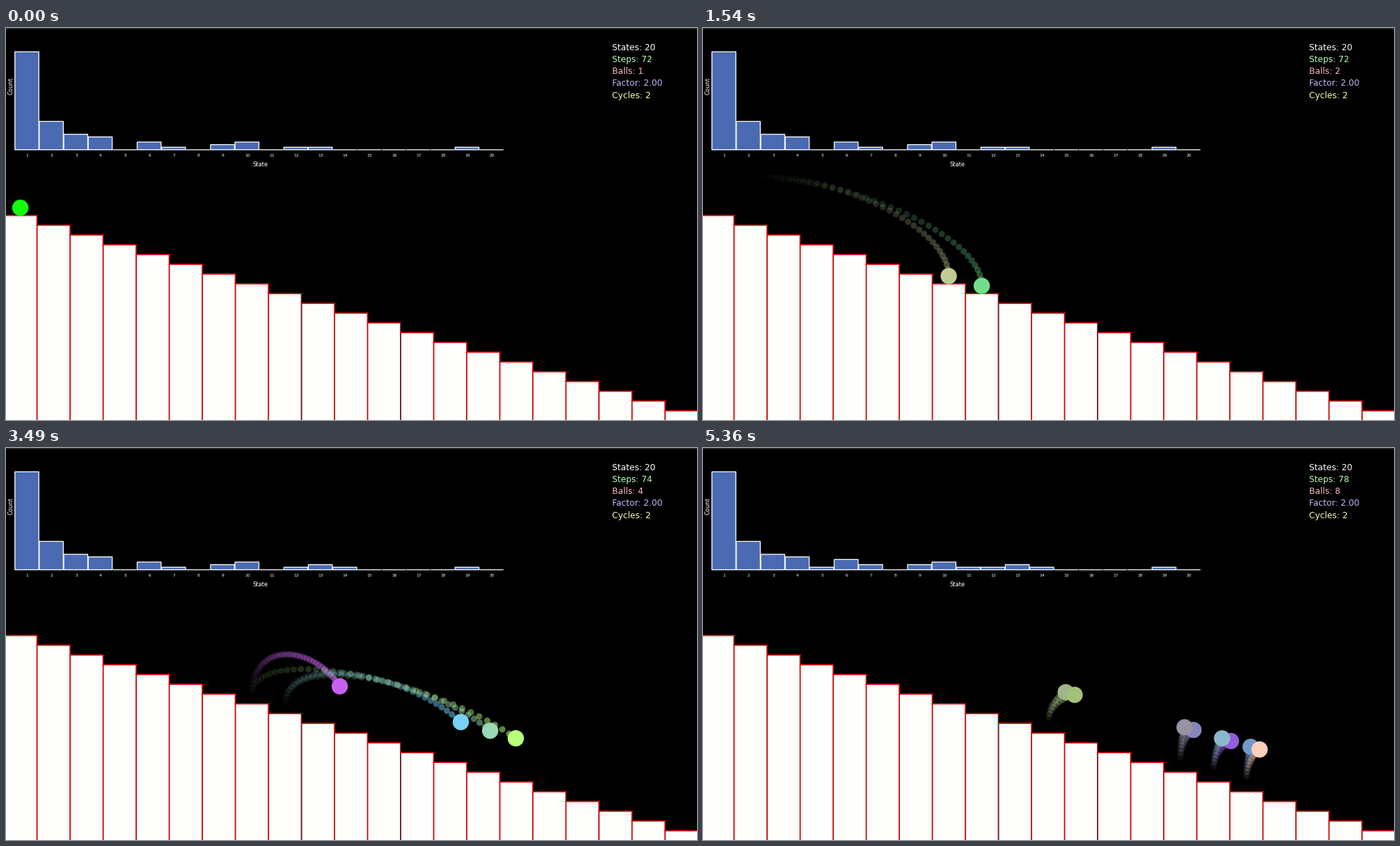
A matplotlib script that plays this animation: 993 by 564 pixels, repeating every 5.39 s.

```python
import numpy as np
import matplotlib.pyplot as plt
from matplotlib.animation import FuncAnimation
from matplotlib.patches import Circle, Rectangle

W, H, DPI = 993, 564, 64
FRAMES, STEP_MS = 154, 35
PT = 72 / DPI                     # points per pixel

# staircase and balls
RUN, RISE = 47.5, 14.05
BALL_R, DOT_R = 11.7, 4.6
HOP_MS, LIFT = 820, 78
DOT_MS, MAX_DOTS, DOT_ALPHA = 17.5, 49, 0.54

# launch time, step counter, landed states, balls (from, to, colour)
HOPS = [
    (-9999, 72, [], [(0, 0, "#14ff0a")]),
    (476, 72, [], [(0, 7, "#c0cb96"), (0, 8, "#72dc8c")]),
    (2826, 74, [13, 14], [
        (7, 10, "#c860f2"), (7, 16, "#b8ff7c"),
        (8, 14, "#78d0f2"), (8, 15, "#98d8b2")]),
    (5176, 78, [5, 6, 7, 11], [
        (10, 14, "#9eb688"), (10, 16, "#a2c27a"),
        (14, 17, "#8686be"), (14, 15, "#9694a4"),
        (15, 19, "#965cdc"), (15, 17, "#8cb8ce"),
        (16, 17, "#7298ce"), (16, 19, "#fcd0b8")]),
]
FIRST_COUNTS = [38, 11, 6, 5, 0, 3, 1, 0, 2, 3, 0, 1, 1, 0, 0, 0, 0, 0, 1, 0]
BAR_X, BAR_PITCH, BAR_W, BAR_BASE, BAR_UNIT = 12.8, 35.14, 34.4, 175.2, 3.71

plt.rcParams["font.family"] = "DejaVu Sans"
fig = plt.figure(figsize=(W / DPI, H / DPI), dpi=DPI, facecolor="black")
ax = fig.add_axes([0, 0, 1, 1])
ax.set_xlim(0, W)
ax.set_ylim(H, 0)
ax.axis("off")


def label(x, y, text, px, color="white", **kw):
    return ax.text(x, y, text, fontsize=px * PT, color=color, **kw)


def rgb(color):
    return [int(color[i:i + 2], 16) / 255 for i in (1, 3, 5)]


def line(xs, ys, color):
    ax.plot(xs, ys, color=color, lw=1.8 * PT, snap=False, zorder=1.5)


def draw_stairs():
    for k in range(21):
        left, top = RUN * k - 2.9, 269.7 + RISE * k
        ax.add_patch(Rectangle((left, top), RUN, H, fc="#fdfdfc", lw=0,
                               snap=False, zorder=1))
        line([left, left + RUN], [top, top], "#dc0a0a")
        edge = "#641419" if k in (8, 11) else "#c40a0a"
        line([left + RUN] * 2, [top, H], edge)


def draw_chart():
    bars = []
    for i in range(20):
        bar = Rectangle((BAR_X + BAR_PITCH * i, BAR_BASE), BAR_W, 0,
                        fc="#4a6ab2", ec="white", lw=1.3 * PT, snap=False,
                        zorder=2)
        bars.append(ax.add_patch(bar))
        label(30.7 + BAR_PITCH * i, 185.3, str(i + 1), 6, ha="center")
    label(365.3, 199.3, "State", 8.4, ha="center")
    label(7, 84, "Count", 8.4, rotation=90, ha="center", va="center")
    return bars


def draw_info():
    colors = ["#ffffff", "#b6ffb6", "#ffb9c4", "#cbb8ff", "#ffffb0"]
    return [label(871.4, 31.8 + 17.2 * i, "", 12.3, c)
            for i, c in enumerate(colors)]


def position(start, end, elapsed):
    p = np.clip(elapsed / HOP_MS, 0, 1)
    s = start + (end - start) * p * p * (3 - 2 * p)
    return np.column_stack([20.6 + RUN * s,
                            258.6 + RISE * s - LIFT * 4 * p * (1 - p)])


def counts_after(n):
    counts = list(FIRST_COUNTS)
    for hop in HOPS[:n + 1]:
        for state in hop[2]:
            counts[state - 1] += 1
    return counts


ax.add_patch(Rectangle((0, 0), W, 2, fc="#242424", lw=0))
draw_stairs()
bars = draw_chart()
info = draw_info()
trail = ax.scatter([], [], s=(2 * DOT_R * PT) ** 2, linewidths=0, zorder=3)
balls = [ax.add_patch(Circle((0, 0), BALL_R, lw=0, zorder=4))
         for _ in HOPS[-1][3]]


def update(frame):
    t = frame * STEP_MS + 10
    n = max(i for i, hop in enumerate(HOPS) if hop[0] <= t)
    launch, steps, _, moves = HOPS[n]
    elapsed = t - launch

    for bar, count in zip(bars, counts_after(n)):
        bar.set_height(-count * BAR_UNIT)
    rows = ["States: 20", f"Steps: {steps}", f"Balls: {len(moves)}",
            "Factor: 2.00", "Cycles: 2"]
    for text, row in zip(info, rows):
        text.set_text(row)

    for i, ball in enumerate(balls):
        ball.set_visible(i < len(moves))

    # oldest dot first, fading along the trail
    size = min(MAX_DOTS, int(elapsed / DOT_MS))
    back = np.arange(size, 0, -1)
    alpha = DOT_ALPHA * (1 - back / max(size, 1))
    spots, shades = [], []
    for ball, (start, end, color) in zip(balls, moves):
        spots.append(position(start, end, elapsed - back * DOT_MS))
        shades += [rgb(color) + [a] for a in alpha]
        ball.center = position(start, end, elapsed)[0]
        ball.set_facecolor(color)
    trail.set_offsets(np.vstack(spots))
    trail.set_facecolors(np.array(shades).reshape(-1, 4))
    return [trail, *balls, *bars, *info]


anim = FuncAnimation(fig, update, frames=FRAMES, interval=STEP_MS,
                     repeat=True, repeat_delay=0, blit=False)
plt.show()
```
